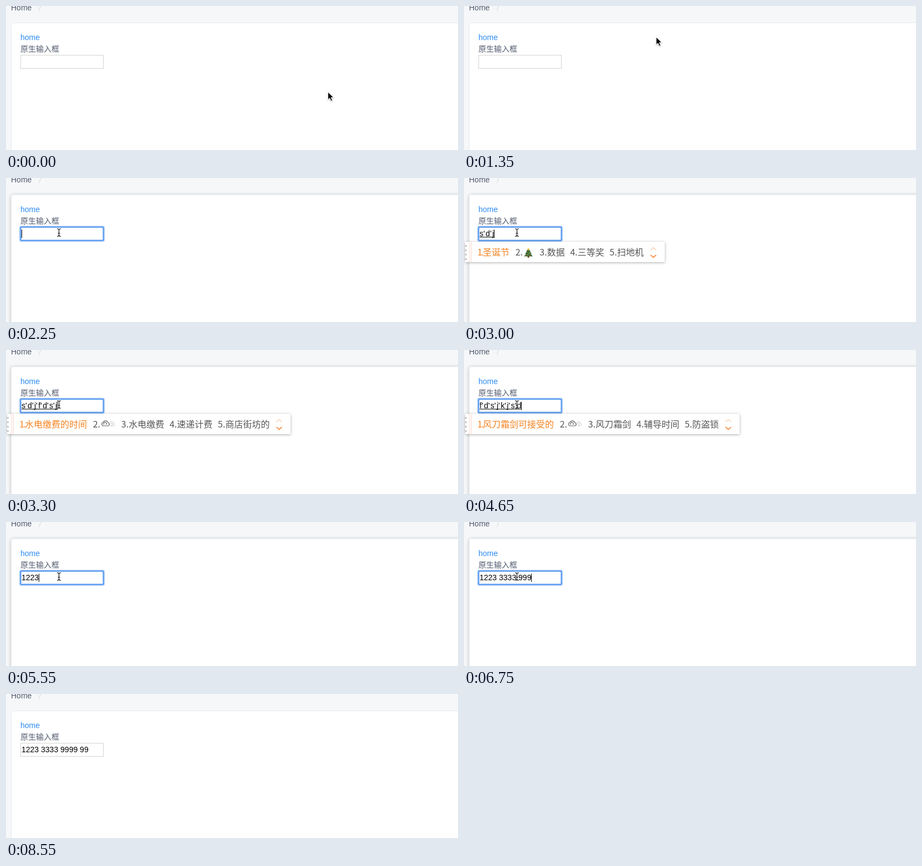
Animation, 815 px wide and 262 px high, one loop 8700 ms. Source, as an HTML page:

```html
<!DOCTYPE html>
<html lang="zh-CN">
<head>
<meta charset="utf-8">
<title>Input</title>
<style>
html, body { margin: 0; width: 100%; height: 100%; overflow: hidden; background: #f5f7f9; }
svg { display: block; width: 815px; height: 262px; }
text { font: 14px 'Liberation Sans', 'Noto Sans CJK SC', 'Noto Sans CJK', sans-serif; fill: #515a6e; white-space: pre; }
#card { fill: #fff; stroke: #e6e9ed; }
#card.hover { stroke: #eaeaea; filter: drop-shadow(0 1px 3px rgba(0,0,0,.22)); }
#value { fill: #000; }
#value .gap { letter-spacing: 1.4px; }
#popup text { font: 16px 'Noto Sans CJK SC', 'Noto Sans CJK', 'Noto Sans', sans-serif; fill: #555; }
#popup .first { fill: #f5821f; }
#popup .tight { letter-spacing: -1.6px; }
#panel { fill: #fff; filter: drop-shadow(0 1px 2.5px rgba(0,0,0,.32)); }
.line { fill: none; stroke-linecap: round; stroke-linejoin: round; }
</style>
</head>
<body>
<svg viewBox="0 0 815 262">
  <defs>
    <g id="tree">
      <path d="M7.5 15h3v3h-3z" fill="#7a4a22"/>
      <path d="M9 1.5L13 6.5H11.5L15 11H13L17 15.5H1L5 11H3L6.5 6.5H5Z" fill="#2f6b35"/>
      <path d="M9 0l1 2 1.6.3-1.2 1.2.3 1.7L9 4.3 7.3 5.2l.3-1.7L6.4 2.3 8 2z" fill="#f2c230"/>
      <g fill="#d8473a"><circle cx="7.5" cy="8.5" r="1"/><circle cx="12" cy="13" r="1"/><circle cx="4.5" cy="14" r="1"/></g>
      <g fill="#e8c14a"><circle cx="10.8" cy="9.5" r=".9"/><circle cx="8" cy="12.5" r=".9"/></g>
    </g>
    <g id="cloud" class="line" stroke-width="1.2">
      <path d="M17 3.5a4 4 0 0 1 6 2a2.7 2.7 0 0 1 0 5H17M17 8a2 2 0 1 1 2 1.5" stroke="#d2d2d2"/>
      <path d="M4.5 10.5a3.3 3.3 0 0 1-.4-6.5a4.6 4.6 0 0 1 8.6.6a3 3 0 0 1 0 5.9ZM5.5 8a2.5 2.5 0 1 1 4 0" stroke="#666"/>
    </g>
  </defs>
  <rect width="815" height="262" fill="#f5f7f9"/>
  <text x="9" y="8">Home</text>
  <path d="M59.5 9L63.3-2" stroke="#d5d8de"/>
  <rect id="card" x="9.5" y="30.5" width="830" height="260" rx="4"/>
  <text x="26" y="62" style="fill:#2d8cf0">home</text>
  <text x="26" y="83">原生输入框</text>
  <rect x="26.5" y="89.5" width="149" height="24" fill="#fff" stroke="#d4d4d4"/>
  <g id="ring" fill="none">
    <rect x="25.5" y="88.5" width="151" height="26" rx="2" stroke="#a9cbf8" stroke-width="3"/>
    <rect x="26.5" y="89.5" width="149" height="24" rx="1" stroke="#5296ee" stroke-width="2"/>
  </g>
  <text id="value" x="28" y="106"></text>
  <path id="under" stroke="#000"/>
  <path id="caret" stroke="#000"/>
  <g id="popup">
    <rect id="panel" x="2" y="116" height="37" rx="1"/>
    <path d="M3.5 122V149" stroke="#c9c9c9" stroke-width="3" stroke-dasharray="3 5"/>
    <path d="M10.5 116V153M13.5 116V153" stroke="#f8d9cb"/>
    <g id="words"></g>
    <g id="arrows" class="line" stroke-width="1.5">
      <path d="M-4.5 130.5L0 126.500L4.500 130.500" stroke="#fad0b0"/>
      <path d="M-4.5 140.5L0 144.500L4.500 140.500" stroke="#f5761a"/>
    </g>
  </g>
  <g id="beam" class="line">
    <path d="M92.500 92.500Q95.500 92.500 95.500 94.500Q95.500 92.500 98.500 92.500M95.500 94V104M92.500 106Q95.500 106 95.500 104Q95.500 106 98.500 106M94 100.500H97" stroke="#fff" stroke-width="2.600" opacity=".7"/>
    <path d="M92.500 92.500Q95.500 92.500 95.500 94.500Q95.500 92.500 98.500 92.500M95.500 94V104M92.500 106Q95.500 106 95.500 104Q95.500 106 98.500 106M94 100.500H97" stroke="#111" stroke-width="1.200"/>
  </g>
  <path id="arrow" d="M.5 .5V14.500L3.700 11.500L6 16.700L8.500 15.600L6.200 10.500H10.600Z" fill="#000" stroke="#fff" style="filter:drop-shadow(0 1px 1px rgba(0,0,0,.35))"/>
</svg>
<script>
const LOOP = 8700, TICK = 150;
const FOCUS = 2250, BEAM_OFF = 7350, LEAVE = 7800, BLUR = 8100;
const $ = id => document.getElementById(id);

// pointer position at each tick until the field is clicked
const path = [
  [580, 156], [604, 192], [662, 234], [716, 248], [741, 232], [712, 184], [620, 133], [511, 97],
  [433, 76], [346, 56], [268, 36], [204, 31], [153, 48], [118, 74], [99, 94]
];

// time, typed text, candidate words
const steps = [
  [0, '1223 3333 9999 99'],
  [2550, 's', '是 说 上 时 使'],
  [2700, "s'd", '时代 速度 手段 深度 属地'],
  [3000, "s'd'j", '圣诞节 #tree 数据 三等奖 扫地机'],
  [3150, "s'd'j'f'd", '水电缴费的 #cloud 水电缴费 速递计费 商店街坊'],
  [3300, "s'd'j'f'd's'j", '水电缴费的时间 #cloud 水电缴费 速递计费 商店街坊的'],
  [3600, ''],
  [3900, 'f', '发 放 分 飞 非'],
  [4050, "f'd", '发动 放大 分店 饭店 房东'],
  [4200, "f'd's", '防盗锁 #cloud 辅导 放大 饭店'],
  [4350, "f'd's'j", '风刀霜剑 #cloud 辅导时间 防盗锁 饭店'],
  [4500, "f'd's'j'k", '风刀霜剑可 #cloud 风刀霜剑 辅导时间 防盗锁'],
  [4650, "f'd's'j'k'j's'd", '风刀霜剑可接受的 #cloud 风刀霜剑 辅导时间 防盗锁'],
  [4950, '']
];
steps[0][1] = '';
const type = (start, from, to, full) => {
  for (let n = from, t = start; n <= to; n++) {
    if (full[n - 1] === ' ') continue;
    steps.push([t, full.slice(0, n)]);
    t += TICK;
  }
};
const digits = '1223 3333 9999 99';
type(5100, 1, 9, digits);
type(6450, 10, digits.length, digits);

const show = (id, on) => $(id).setAttribute('visibility', on ? 'visible' : 'hidden');

function drawWords(list) {
  let x = 24, out = '';
  list.split(' ').forEach((word, i) => {
    const lead = i ? 13.4 : 10, icon = word[0] === '#';
    const cls = i ? '' : 'first';
    out += `<text class="${cls} ${i ? '' : 'tight'}" x="${x}" y="141">${i + 1}.</text>`;
    out += icon
      ? `<use href="${word}" x="${x + lead + 1}" y="${word === '#tree' ? 127 : 127.5}"/>`
      : `<text class="${cls}" x="${x + lead}" y="141">${word}</text>`;
    const width = icon ? (word === '#tree' ? 20.5 : 28) : word.length * 16;
    x += lead + width + (i ? 9.7 : 10.7);
  });
  const right = Math.round(x + 28.3);
  $('words').innerHTML = out;
  $('panel').setAttribute('width', right - 2);
  $('arrows').setAttribute('transform', `translate(${right - 20.5} 0)`);
}

function drawField(t) {
  const [, text, words] = steps.filter(s => s[0] <= t).pop();
  const value = $('value');
  value.innerHTML = text.replace(/'/g, '<tspan class="gap">\'</tspan>');
  const end = 28 + (text ? value.getComputedTextLength() : 0);
  const edge = Math.floor(end) + .5;
  $('caret').setAttribute('d', `M${edge} 94V109`);
  $('under').setAttribute('d', `M28 107.5H${end}`);
  show('under', words);
  show('popup', words);
  if (words) drawWords(words);
}

function draw(t) {
  const focused = t >= FOCUS && t < BLUR;
  drawField(t);
  show('ring', focused);
  show('caret', focused && t < 7800);
  show('beam', t >= FOCUS && t < BEAM_OFF);
  show('arrow', t < FOCUS);
  $('card').setAttribute('class', t >= FOCUS && t < LEAVE ? 'hover' : '');
  if (t < FOCUS) $('arrow').setAttribute('transform', `translate(${path[t / TICK]})`);
}

let last = -1;
const start = performance.now();
function frame() {
  const t = Math.floor((performance.now() - start) % LOOP / TICK) * TICK;
  if (t !== last) draw(last = t);
  requestAnimationFrame(frame);
}
frame();
</script>
</body>
</html>
```
